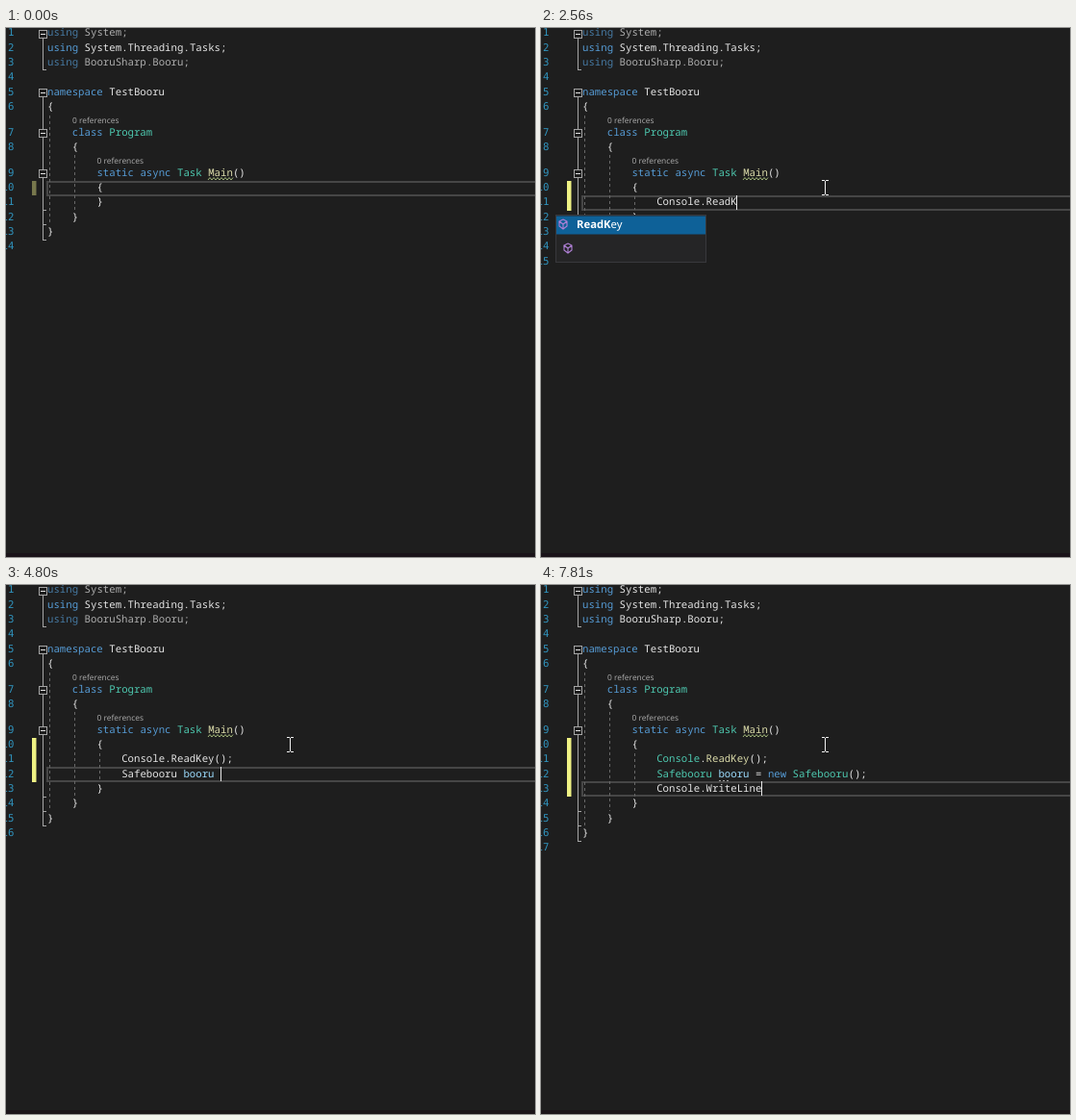
An HTML page with a canvas for the animation above (8 s loop, 550x550 px).

```html
<!DOCTYPE html>
<html lang="en">
<head>
<meta charset="utf-8">
<title>Typing in a code editor</title>
<style>
html, body { margin: 0; width: 100%; height: 100%; overflow: hidden; background: #1e1e1e; }
canvas { display: block; }
</style>
</head>
<body>
<canvas id="stage" width="550" height="550"></canvas>
<script>
const ctx = document.getElementById('stage').getContext('2d');
const LOOP = 8000, CHAR = 6.43, PITCH = 15.3;
const CODE = '500 10.7px "Noto Sans Mono", monospace';
const NUMBERS = '10.7px "DejaVu Sans Mono", monospace';
const UI = '11.3px "Noto Sans", sans-serif';
const UI_BOLD = 'bold ' + UI;
const LENS = '8.4px "Noto Sans", sans-serif';
const BG = '#1e1e1e', TEXT = '#e6e6e6', BLUE = '#569cd6', TEAL = '#4ec9b0',
      LOCAL = '#9cdcfe', METHOD = '#dcdcaa', GOLD = '#efc48a', PURPLE = '#b180d7', SKY = '#6cb8ff';

const KEYWORDS = /^(using|namespace|class|static|async|new|null)$/;
const TYPES = /^(Program|Task|Console|Safebooru)$/;
const METHODS = /^(Main|ReadKey|WriteLine)$/;

// Completion lists: x, width, items, typed prefix, filter icons shown, selected row
const popup = (x, w, items, prefix, filters, selected = 0) => ({ x, w, items, prefix, filters, selected });
const START = ['#if', '#region', 'AccessViolationException', 'Action', 'Action<>', 'ActivationContext',
  'Activator', 'AggregateException', 'AppContext'];
const CONSOLE = ['Console', 'ConsoleCancelEventArgs', 'ConsoleColor', 'ConsoleKey', 'ConsoleKeyInfo',
  'ConsoleModifiers', 'ConsoleSpecialKey', 'ContextBoundObject', 'Convert'];
const MEMBERS = ['BackgroundColor', 'Beep', 'BufferHeight', 'BufferWidth', 'CapsLock', 'Clear',
  'CursorLeft', 'CursorSize', 'CursorTop'];
const READ = ['Read', 'ReadKey', 'ReadLine', 'ResetColor', 'OpenStandardError', 'CursorLeft',
  'CursorTop', 'ForegroundColor', 'TreatControlCAsInput'];
const SAFE = ['Safebooru', 'SByte', 'Single', 'STAThreadAttribute', 'String', 'StringComparer',
  'StringComparison', 'StringSplitOptions', 'static'];
const NEW = ['namespace', 'new', 'nameof', 'NotImplementedException', 'null', 'Nullable',
  'NullReferenceException', 'Boolean', 'Konachan'];
const WRITE = ['Write', 'WriteLine', 'SetWindowSize', 'BufferWidth', 'WindowHeight', 'WindowLeft',
  'WindowTop', 'WindowWidth', 'LargestWindow'];
const words = (p) => popup(120, 255, CONSOLE, p, 9);
const again = (p) => popup(120, 283, CONSOLE, p, 10);
const read = (p) => popup(14, 158, READ, p, 3);
const readKey = popup(14, 158, ['ReadKey'], 'ReadK', 1);
const safe = (p) => popup(120, 255, SAFE, p, 9);
const safeShort = (p) => popup(120, 255, ['Safebooru', 'STAThreadAttribute'], p, 9);
const naming = (p) => popup(45, 140, ['safebooru', 'booru'], p, 0);
const writing = (p) => popup(33, 139, WRITE, p, 3);
const writeLine = popup(80, 92, ['Write', 'WriteLine', 'WindowTop'], 'Wri', 3);
const SAFE_LINE = 'Safebooru booru = new Safebooru';

// Time, line being edited, its text ('|' marks a caret inside it), popup or hint
const STEPS = [
  [0, 10, '{'], [1230, 11, ''],
  [1550, 11, 'C', popup(120, 255, START, 'C', 9, -1)], [1630, 11, 'Co', words('Co')],
  [1700, 11, 'Con', words('Con')], [1780, 11, 'Cons', words('Cons')],
  [1850, 11, 'Conso', words('Conso')], [1930, 11, 'Console'],
  [2100, 11, 'Console.', popup(33, 139, MEMBERS, '', 3, -1)], [2180, 11, 'Console.R', read('R')],
  [2260, 11, 'Console.Re', read('Re')], [2340, 11, 'Console.Rea', read('Rea')],
  [2480, 11, 'Console.Read', read('Read')], [2560, 11, 'Console.ReadK', readKey],
  [2800, 11, 'Console.ReadKey(|)', 'readKeyHint'], [2880, 11, 'Console.ReadKey()', 'readKeyHint'],
  [2950, 11, 'Console.ReadKey();'], [3260, 12, ''],
  [3490, 12, 'S', safe('S')], [3570, 12, 'Sa', safe('Sa')], [3640, 12, 'Saf', safe('Saf')],
  [3720, 12, 'Safe', safe('Safe')], [3800, 12, 'Safeb', safeShort('Safeb')],
  [3950, 12, 'Safeboo', safeShort('Safeboo')], [4030, 12, 'Safebooru'],
  [4180, 12, 'Safebooru ', naming('')], [4260, 12, 'Safebooru b', naming('b')],
  [4340, 12, 'Safebooru bo', naming('bo')], [4410, 12, 'Safebooru boo', naming('boo')],
  [4570, 12, 'Safebooru boor', naming('boor')], [4640, 12, 'Safebooru booru'],
  [4800, 12, 'Safebooru booru '], [4950, 12, 'Safebooru booru ='],
  [5180, 12, 'Safebooru booru = '], [5260, 12, 'Safebooru booru = n', popup(-47, 283, NEW, 'n', 10, 1)],
  [5340, 12, 'Safebooru booru = ne', popup(-47, 283, NEW, 'ne', 10, 1)],
  [5410, 12, 'Safebooru booru = new'],
  [5490, 12, 'Safebooru booru = new ', popup(7, 255, SAFE, '', 9)],
  [5570, 12, 'Safebooru booru = new S', popup(7, 255, SAFE, 'S', 9)],
  [5640, 12, SAFE_LINE + '(|)', 'ctorHint'], [5800, 12, SAFE_LINE + '()'],
  [5880, 12, SAFE_LINE + '();'], [6110, 13, ''],
  [6730, 13, 'C', popup(120, 283, START, 'C', 10, -1)], [6810, 13, 'Co', again('Co')],
  [6880, 13, 'Con', again('Con')], [6960, 13, 'Cons', again('Cons')], [7040, 13, 'Console'],
  [7190, 13, 'Console.', popup(33, 139, MEMBERS, '', 3, -1)], [7270, 13, 'Console.W', writing('W')],
  [7340, 13, 'Console.Wr', writing('Wr')], [7420, 13, 'Console.Wri', writeLine],
  [7730, 13, 'Console.WriteL', writeLine], [7810, 13, 'Console.WriteLine']
];

// Two reference labels take extra height above lines 7 and 9
const lineTop = (n) => 158.5 + PITCH * (n - 10) - (n < 9 ? 11.5 : 0) - (n < 7 ? 11.5 : 0);
const baseline = (n) => Math.floor(lineTop(n) + 11);
const column = (c) => 43 + CHAR * c;

function rect(x, y, w, h, color) {
  ctx.fillStyle = color;
  ctx.fillRect(x, y, w, h);
}

function frame(x, y, w, h, color, width = 1) {
  ctx.strokeStyle = color;
  ctx.lineWidth = width;
  ctx.strokeRect(x, y, w, h);
}

function write(text, x, y, color, font) {
  ctx.font = font;
  ctx.fillStyle = color;
  ctx.fillText(text, x, y);
  return x + ctx.measureText(text).width;
}

function path(color, points, width = 1, fill = false) {
  ctx.beginPath();
  points.forEach(([x, y]) => ctx.lineTo(x, y));
  ctx.lineWidth = width;
  ctx.strokeStyle = ctx.fillStyle = color;
  fill ? ctx.fill() : ctx.stroke();
}

function wordColor(word, parsed) {
  if (KEYWORDS.test(word)) return BLUE;
  if (word === 'booru') return LOCAL;
  if (parsed && TYPES.test(word)) return TEAL;
  if (parsed && METHODS.test(word)) return METHOD;
  return TEXT;
}

function codeLine(n, indent, text, parsed = true, alpha = 1) {
  ctx.globalAlpha = alpha;
  for (const { 0: word, index } of text.matchAll(/\w+|[^\w\s]+/g))
    write(word, column(indent + index), baseline(n), wordColor(word, parsed), CODE);
  ctx.globalAlpha = 1;
}

function foldBox(n) {
  const y = Math.round(lineTop(n) + 4);
  rect(34, y, 9, 9, BG);
  frame(34.5, y + .5, 8, 8, '#a5a5a5');
  rect(36, y + 4, 5, 1, '#e0e0e0');
}

function margin(row) {
  const count = row + 4;
  ctx.textAlign = 'right';
  for (let n = 1; n <= count; n++) write(n, 8.4, baseline(n), '#3093bd', NUMBERS);
  ctx.textAlign = 'left';

  rect(27, 159, 4.5, Math.round(PITCH * (row - 9)), row > 10 ? '#eff284' : '#77774c');

  const end = Math.round(lineTop(row + 4));
  rect(38, 6, 1, 37, '#a5a5a5');
  rect(38, 43, 4, 1, '#a5a5a5');
  rect(38, 67, 1, end - 67, '#a5a5a5');
  for (let n = row + 2; n <= row + 4; n++) rect(38, Math.round(lineTop(n)), 4, 1, '#a5a5a5');
  [1, 5, 7, 9].forEach(foldBox);

  ctx.setLineDash([3, 3]);
  path('#686868', [[45.5, 91], [45.5, lineTop(row + 3)]]);
  path('#686868', [[71.5, 132], [71.5, lineTop(row + 2)]]);
  if (row > 10) path('#686868', [[97.5, 175], [97.5, lineTop(row + 1)]]);
  ctx.setLineDash([]);
}

function editor(t, row, text) {
  const top = Math.round(lineTop(row));
  frame(43, top + 1, 530, 14, '#464646', 2);
  margin(row);

  const used = t >= 6880 ? 1 : .72;
  codeLine(1, 0, 'using System;', true, used);
  codeLine(2, 0, 'using System.Threading.Tasks;');
  codeLine(3, 0, 'using BooruSharp.Booru;', true, used);
  codeLine(5, 0, 'namespace TestBooru');
  codeLine(6, 0, '{');
  write('0 references', 69, 99, '#a5a5a5', LENS);
  codeLine(7, 4, 'class Program');
  codeLine(8, 4, '{');
  write('0 references', 94.5, 141, '#a5a5a5', LENS);
  codeLine(9, 8, 'static async Task Main()');
  path('#a3b87a', Array.from({ length: 14 }, (_, i) => [210 + i * 2, i % 2 ? 155.5 : 158]));
  codeLine(10, 8, '{');

  const parsed = t >= 6410;
  if (row > 11) codeLine(11, 12, 'Console.ReadKey();', parsed);
  if (row > 12) codeLine(12, 12, SAFE_LINE + '();', parsed);
  if (row > 10) codeLine(row, 12, text.replace('|', ''), false);
  if (t >= 6880) for (let i = 0; i < 3; i++) rect(185 + i * 4, 203, 2, 1, '#a0a0a0');
  codeLine(row + 1, 8, '}');
  codeLine(row + 2, 4, '}');
  codeLine(row + 3, 0, '}');

  const split = text.indexOf('|');
  const caret = Math.floor(column((row > 10 ? 12 : 8) + (split < 0 ? text.length : split)));
  if (split >= 0) rect(caret + 1, top + 15, 5, 1, '#a0a0a0');
  const hidden = t < 300 || (t >= 830 && t < 1230) || (t >= 6580 && t < 6730);
  if (!hidden) rect(caret, top, 1, 15, TEXT);
}

const diamond = (x, y, r, color) => path(color, [[x - r, y], [x, y - r], [x + r, y], [x, y + r]], 1, true);

const ICONS = {
  snippet(x, y) {
    frame(x - 4.5, y - 5.5, 10, 11, '#c8c8c8');
  },
  class(x, y) {
    path(GOLD, [[x - 2, y - 1], [x + 4, y - 1], [x + 1, y - 1], [x + 1, y + 4], [x + 4, y + 4]]);
    diamond(x - 2.5, y - 1.5, 4.5, GOLD);
    diamond(x + 4.5, y, 2.6, GOLD);
    diamond(x + 3.5, y + 4.5, 2.6, GOLD);
  },
  delegate(x, y) {
    rect(x - 7, y - 2, 9, 6, PURPLE);
    frame(x - 4.5, y - 4.5, 4, 3, PURPLE);
    rect(x - 5, y, 5, 1, BG);
  },
  enum(x, y) {
    frame(x - 2.5, y - 3.5, 7, 4, GOLD, 1.4);
    frame(x - 6.5, y + .5, 6, 3, GOLD, 1.4);
  },
  struct(x, y) {
    rect(x - 1, y - 5, 6, 6, SKY);
    rect(x - 6, y, 5, 5, SKY);
  },
  lines(x, y) {
    [9, 5, 13, 9, 13].forEach((w, i) => rect(x - 7, y - 5 + i * 2.5, w, 1, '#c8c8c8'));
  },
  constant(x, y) {
    path('#c8c8c8', [[x - 4, y - 4], [x - 6, y - 4], [x - 6, y + 4], [x - 4, y + 4]]);
    path('#c8c8c8', [[x + 4, y - 4], [x + 6, y - 4], [x + 6, y + 4], [x + 4, y + 4]]);
    diamond(x, y, 4, '#c8c8c8');
  },
  braces(x, y) { write('{ }', x - 6, y + 4, '#dcdcdc', UI_BOLD); },
  method(x, y) {
    path(PURPLE, [[x - 2, y - 5], [x + 2, y - 3], [x + 2, y + 2], [x - 2, y + 5], [x - 6, y + 2], [x - 6, y - 3],
      [x - 2, y - 5], [x - 6, y - 3], [x - 2, y], [x + 2, y - 3], [x - 2, y], [x - 2, y + 5]], 1.1);
  },
  interface(x, y) {
    rect(x - 4, y - 1, 7, 1.6, SKY);
    ctx.beginPath();
    ctx.arc(x - 5, y, 2, 0, 7);
    ctx.fill();
    ctx.beginPath();
    ctx.arc(x + 4, y, 2.6, 0, 7);
    ctx.lineWidth = 1.6;
    ctx.strokeStyle = SKY;
    ctx.stroke();
  }
};
const FILTERS = ['snippet', 'class', 'delegate', 'enum', 'struct', 'lines', 'constant', 'braces', 'method', 'interface'];

function itemIcon(item, { filters }) {
  if (item[0] === '#' || /^[a-z]/.test(item)) return 'snippet';
  if (item.startsWith('Action')) return 'delegate';
  return filters < 9 ? 'method' : 'class';
}

function drawPopup(p, row) {
  const { x, w, items, prefix, filters, selected } = p;
  const y = Math.round(lineTop(row) + 19.75), listEnd = y + 2 + 19 * items.length;
  const h = 19 * items.length + (filters ? 31 : 4);
  rect(x + 1, y, w - 1, h, '#252526');
  frame(x + 1.5, y + .5, w - 2, h - 1, '#38383c');
  items.forEach((item, i) => {
    const mid = y + 10.5 + 19 * i;
    if (i === selected) rect(x + 2, mid - 9, w - 3 - (items.length > 8 ? 16 : 0), 19, '#0e6198');
    ICONS[itemIcon(item, p)](x + 11, Math.floor(mid));
    let at = x + 23;
    for (const part of prefix ? item.split(new RegExp(`(${prefix})`)) : [item])
      at = write(part, at, Math.floor(mid + 4), '#fff', part === prefix ? UI_BOLD : UI);
  });
  if (items.length > 8) {
    const mid = x + w - 9.5;
    rect(mid - 8, y + 1, 16, 172, '#3e3e42');
    rect(mid - 4.5, y + 18, 9, 8, '#686868');
    path('#999', [[mid - 4.5, y + 12], [mid, y + 7], [mid + 4.5, y + 12]], 1, true);
    path('#999', [[mid - 4.5, y + 161], [mid, y + 166], [mid + 4.5, y + 161]], 1, true);
  }
  const shown = filters < 9 ? ['method', 'delegate', 'struct'] : FILTERS;
  shown.slice(0, filters).forEach((name, i) => ICONS[name](Math.round(x + 16 + 28 * i), listEnd + 14));
}

function hintBox(x, y, w, h, parts) {
  rect(x, y, w, h, '#424245');
  frame(x + .5, y + .5, w - 1, h - 1, '#55555a');
  let at = x + 7.5;
  for (const [text, color, font = UI] of parts) at = write(text, at, y + 14, color, font);
}

const HINTS = {
  readKeyHint() {
    hintBox(14, 194, 560, 39, [['▲ 1 of 2 ▼  ', TEXT], ['ConsoleKeyInfo', TEAL], [' ', TEXT],
      ['Console', TEAL], ['.', TEXT], ['ReadKey', METHOD], ['()', TEXT]]);
    write('Obtains the next character or function key pressed by the user. The pressed key is displayed in the console window.',
      21.5, 225, TEXT, UI);
  },
  ctorHint() {
    hintBox(30, 209, 207, 23, [['Safebooru', TEAL], ['(', TEXT], ['[', '#f1f1f1', UI_BOLD],
      ['BooruAuth', TEAL, UI_BOLD], [' auth', LOCAL, UI_BOLD], [' = ', TEXT],
      ['null', BLUE, UI_BOLD], [']', '#f1f1f1', UI_BOLD], [')', TEXT]]);
  }
};

function pointer(t) {
  if (t < 150) return;
  const tick = Math.min(1, Math.floor((t - 149) / 77) / 10) - 1;
  const ease = 1 + 2.4 * tick ** 3 + 1.4 * tick ** 2; // settles after a slight overshoot
  const x = Math.round(438 - 143 * ease), y = Math.round(467 - 301 * ease);
  rect(x, y - 7, 1, 14, '#f0f0f0');
  for (const dy of [-8, 7]) {
    rect(x - 3, y + dy, 3, 1, '#f0f0f0');
    rect(x + 1, y + dy, 3, 1, '#f0f0f0');
  }
}

function draw() {
  const t = performance.now() % LOOP;
  const [, row, text, extra] = STEPS.findLast(([at]) => at <= t);
  ctx.textRendering = 'geometricPrecision';
  rect(0, 0, 550, 550, BG);
  rect(0, 546, 550, 4, '#1a1319');
  editor(t, row, text);
  if (typeof extra === 'string') HINTS[extra]();
  else if (extra) drawPopup(extra, row);
  pointer(t);
  requestAnimationFrame(draw);
}
draw();
</script>
</body>
</html>
```
